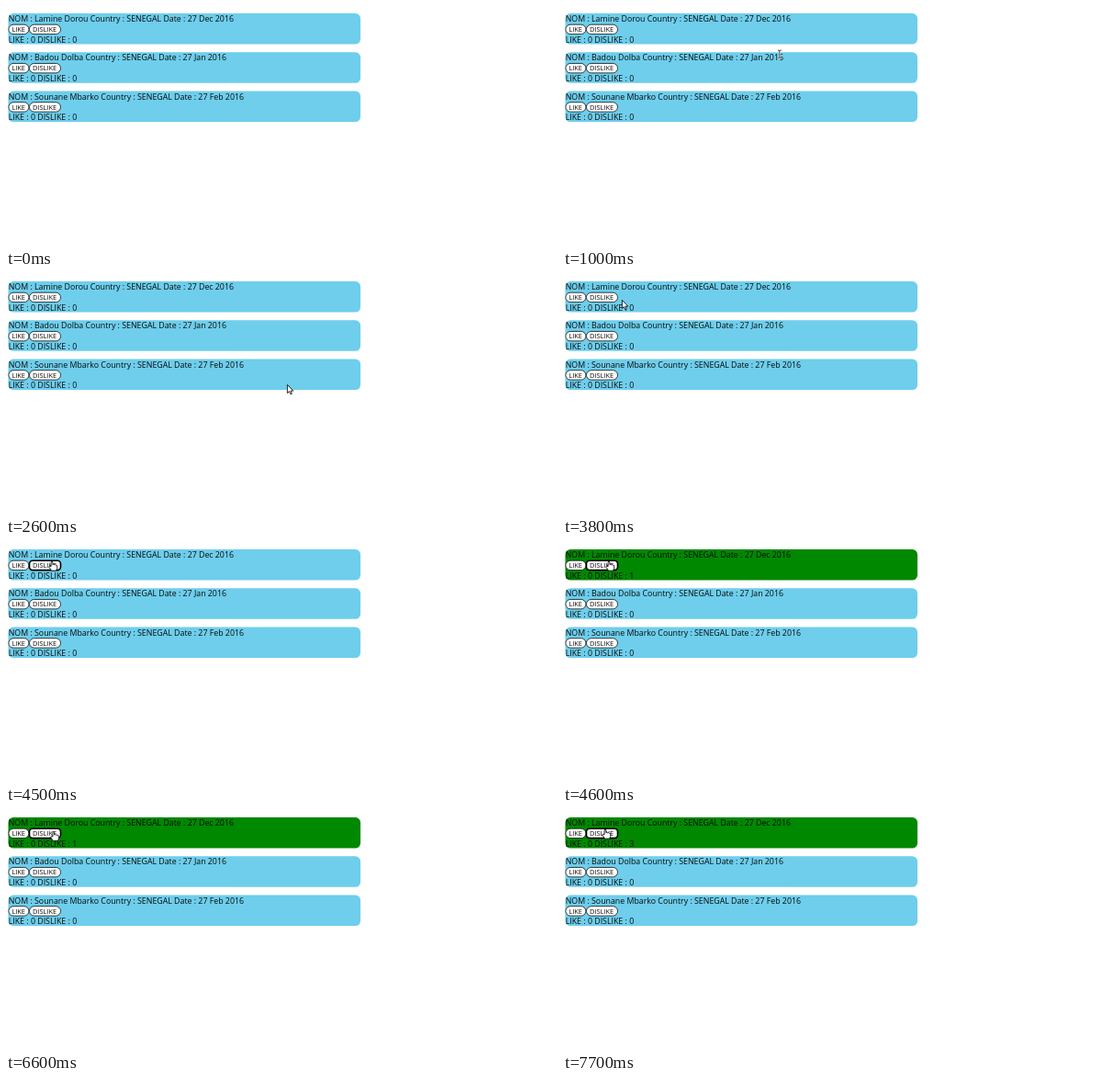
Animation of 600x261 px, one loop 8 s. Source, as an HTML page:

```html
<!DOCTYPE html>
<html lang="fr">
<head>
<meta charset="utf-8">
<title>Like / dislike cards</title>
<style>
  html, body { margin: 0; width: 100%; height: 100%; overflow: hidden; background: #fff; }
  svg { display: block; }
  text { font: 8.8px "Open Sans", "Noto Sans", sans-serif; fill: #0a0a0a; white-space: pre; }
  .card { fill: #6eceec; }
  .card.voted { fill: #008800; }
  .btn rect { fill: #fff; stroke: #111; stroke-width: .8; rx: 5.2px; }
  .btn text { font-size: 7.4px; }
  .btn.focus rect { stroke: #000; stroke-width: 1.6; rx: 3.5px; }
  #arrow, #hand { fill: #fff; stroke: #111; stroke-width: .9; stroke-linejoin: round; }
  #beam { fill: none; stroke: #111; stroke-width: .8; }
  #beam .halo { stroke: #fff; stroke-width: 1.9; }
</style>
</head>
<body>
<svg width="600" height="261" viewBox="0 0 600 261">
  <defs><path id="bar" d="M-2-4.5Q0-4.5 0-3.6 0-4.5 2-4.5M0-3.6V3.6M-2 4.5Q0 4.5 0 3.6 0 4.5 2 4.5"/></defs>
  <g id="cards"></g>
  <g id="cursor">
    <path id="arrow" d="M.4 .4V9.5L2.5 7.6 3.9 10.8 5.4 10.1 4 7.1H6.8Z"/>
    <path id="hand" d="M-.9 5.6V.8Q0-.4 .9 .8V3.6Q1.9 2.8 2.6 3.8 3.6 3.1 4.2 4.2 5.6 3.8 5.7 5.2V7.4L4.7 10.2H-.4L-3 6.6Q-3.2 5.2-2 5.2Z"/>
    <g id="beam"><use href="#bar" class="halo"/><use href="#bar"/></g>
  </g>
</svg>
<script>
const LOOP = 8000, STEP = 100;
const TOP = 8.1, PITCH = 42.25;
const $ = id => document.getElementById(id);

const people = [["Lamine Dorou", "Dec"], ["Badou Dolba", "Jan"], ["Sounane Mbarko", "Feb"]];

const label = (x, y, s) => `<text x="${x}" y="${y}">${s}</text>`;
const button = (x, w, s) =>
  `<g class="btn"><rect x="${x}" y="20.2" width="${w}" height="10.4"/>${label(x + 3.5, 28.1, s)}</g>`;

$("cards").innerHTML = people.map(([name, month], i) => `<g transform="translate(0 ${i * PITCH})">
  <rect class="card" x="2.5" y="${TOP}" width="383.5" height="33.5" rx="5.5"/>
  ${label(2.7, 17.1, `NOM : ${name} Country : SENEGAL Date : 27 ${month} 2016`)}
  ${button(2.9, 22, "LIKE")}${button(25.5, 34, "DISLIKE")}
  <text class="votes" x="2.7" y="39.5">LIKE : 0 DISLIKE : 0</text></g>`).join("");

const card = document.querySelector(".card");
const dislike = document.querySelectorAll(".btn")[1];
const votes = document.querySelector(".votes");

// Straight pointer strokes: first step, last step, end point. It rests between them.
const start = [333, 7], shown = 700;
const strokes = [
  [900, 1300, 90, 121],
  [1500, 1600, 18, 157],
  [1700, 1700, 55, 169],
  [1800, 1900, 226, 131],
  [2100, 2300, 207, 133],
  [2400, 2600, 306, 120],
  [2700, 3000, 378, 89],
  [3200, 3400, 209, 28],
  [3600, 3800, 64, 28],
  [3900, 4200, 50, 21],
  [4900, 5200, 84, 38],
  [5300, 5700, 75, 31],
  [5800, 6100, 75, 33],
  [6300, 6700, 46, 21]
];
const pressed = 4500, clicks = [4600, 7100, 7700];

function pointerAt(t) {
  let [x, y] = start;
  for (const [from, to, endX, endY] of strokes) {
    if (t < from) break;
    const u = Math.min(1, (t - from + STEP) / (to - from + STEP));
    x += (endX - x) * u;
    y += (endY - y) * u;
  }
  return [x, y];
}

// The pointer takes its shape from what lies under it.
function shapeAt([x, y]) {
  const row = Math.floor((y - TOP) / PITCH);
  if (!people[row]) return "arrow";
  const dy = y - TOP - row * PITCH;
  if (dy > 12 && dy < 22.5) return x > 2 && x < 60 ? "hand" : "arrow";
  const textEnd = dy <= 12 ? 250 : dy < 33.5 ? 78 : 0;
  return x < textEnd ? "beam" : "arrow";
}

function draw(now) {
  const t = Math.floor((now % LOOP) / STEP) * STEP;
  const count = clicks.filter(c => t >= c).length;
  card.classList.toggle("voted", count > 0);
  dislike.classList.toggle("focus", t >= pressed);
  votes.textContent = `LIKE : 0 DISLIKE : ${count}`;

  const pos = pointerAt(t), shape = shapeAt(pos);
  $("cursor").setAttribute("transform", `translate(${pos})`);
  $("cursor").style.display = t < shown ? "none" : "";
  for (const id of ["arrow", "hand", "beam"]) $(id).style.display = id === shape ? "" : "none";
}

const t0 = performance.now();
(function tick() {
  draw(performance.now() - t0);
  requestAnimationFrame(tick);
})();
</script>
</body>
</html>
```
